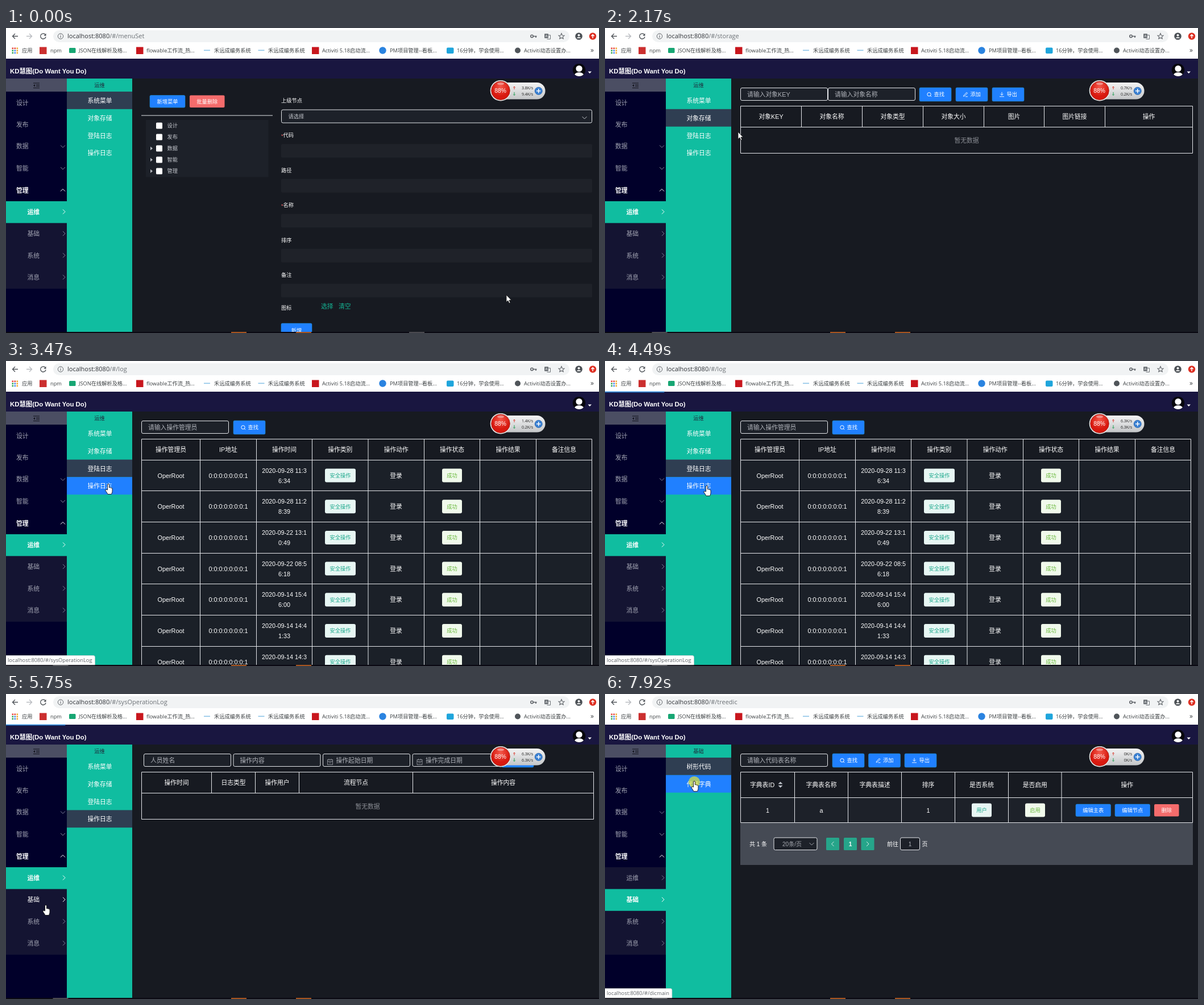
Write an HTML page that moves like this. It is 1043x537 px and loops after 8000 ms.

```html
<!DOCTYPE html>
<html lang="zh-CN">
<head>
<meta charset="utf-8">
<title>Admin console</title>
<style>
html, body { margin: 0; width: 100%; height: 100%; overflow: hidden; background: #171a21; }
svg { display: block; width: 100%; height: 100%; }
text { font-family: "Liberation Sans", "Noto Sans CJK SC", "Noto Sans CJK", sans-serif; white-space: pre; }
.ui { font-family: "Open Sans", "Noto Sans CJK SC", "Noto Sans CJK", sans-serif; }
</style>
</head>
<body>
<svg id="stage" viewBox="0 0 1043 537" preserveAspectRatio="none"></svg>
<script>
const LOOP = 8000, S = 9.24, M = 10.8;
const BLUE = '#2080ff', RED = '#f56c6c', GREEN = '#10bda0', LINE = '#e4e6ea', ROW = '#1d2129', BG = '#171a21';

// --- drawing helpers; text is placed by its vertical centre ---
const rect = (x, y, w, h, fill, extra = '') => `<rect x="${x}" y="${y}" width="${w}" height="${h}" fill="${fill}" ${extra}/>`;
const circle = (x, y, r, fill, extra = '') => `<circle cx="${x}" cy="${y}" r="${r}" fill="${fill}" ${extra}/>`;
const path = (d, stroke, w = 1, extra = 'fill="none"') => `<path d="${d}" stroke="${stroke}" stroke-width="${w}" ${extra}/>`;
const fillPath = (d, fill) => `<path d="${d}" fill="${fill}"/>`;
const text = (x, y, s, size = M, fill = '#fff', extra = '') =>
  `<text x="${x}" y="${(y + size * 0.37).toFixed(2)}" font-size="${size}" fill="${fill}" ${extra}>${s}</text>`;
const mid = (x, y, s, size, fill, extra = '') => text(x, y, s, size, fill, 'text-anchor="middle" ' + extra);
const ui = (x, y, s, size, fill, extra = '') => text(x, y, s, size, fill, 'class="ui" ' + extra);
const at = (from, to, body) => `<g data-on="${from},${to}">${body}</g>`;
const W5 = 'font-weight="500"';

const chevron = (x, y, dir, color) => {
  const d = { down: 'M-4-2L0 2L4-2', up: 'M-4 2L0-2L4 2', right: 'M-2-4L2 0L-2 4', left: 'M2-4L-2 0L2 4' }[dir];
  return `<g transform="translate(${x} ${y})">${path(d, color)}</g>`;
};
const icons = {
  search: circle(0, 0, 3.2, 'none', 'stroke="#fff"') + path('M2.3 2.3L4.2 4.2', '#fff'),
  edit: path('M-3 2L2-3.5L3.5-2L-1.5 3L-3.5 3.5ZM0 4H4', '#fff', .9),
  load: path('M0-4V1.5M-2.5-1L0 1.5L2.5-1M-4 4H4', '#fff', .9)
};
const box = (x, y, w, h = 23) => rect(x + .5, y + .5, w - 1, h - 1, ROW, `rx="2.5" stroke="${LINE}"`);
const field = (x, s, date) => box(x, 105, 154) +
  (date ? path(`M${x + 8.5} 115.5h9v9h-9zM${x + 8.5} 118.5h9M${x + 11} 114v2M${x + 15} 114v2M${x + 10.5} 121h5`, '#a5a8af', .8) : '') +
  text(x + (date ? 23.5 : 12), 116.5, s, M, '#b0b3ba');
const button = (x, y, w, h, s, fill = BLUE) =>
  rect(x, y, w, h, fill, `rx="2"` + (fill === BLUE ? ' stroke="#1b8fd0" stroke-width=".6"' : '')) +
  mid(x + w / 2, y + h / 2, s, S, '#fff', W5);
const tool = (x, icon, s) => rect(x, 105, 56, 24, BLUE, 'rx="2" stroke="#1b8fd0" stroke-width=".6"') +
  `<g transform="translate(${x + 17} 116.8)">${icons[icon]}</g>` + text(x + 25.5, 117, s, S, '#fff', W5);
const tag = (x, y, w, s, kind) => rect(x - w / 2, y - 12, w, 24, kind ? '#f0f9eb' : '#e7f6f3', 'rx="3"') +
  mid(x, y, s, S, kind ? '#67b83a' : '#1aa78b');

// table frame: column edges, row edges, heading texts
function grid(xs, ys, heads) {
  const x0 = xs[0], x1 = xs[xs.length - 1], y0 = ys[0], y1 = ys[ys.length - 1];
  const headY = (y0 + ys[1]) / 2;
  let d = '';
  ys.forEach(y => d += `M${x0} ${y}H${x1}`);
  xs.forEach((x, i) => {
    const edge = i === 0 || i === xs.length - 1 || ys.full;
    d += `M${x} ${y0}V${edge ? y1 : ys[1]}`;
  });
  return path(d, LINE) + heads.map((h, i) => mid((xs[i] + xs[i + 1]) / 2, headY, h, M, '#fff', W5)).join('');
}
const noData = grid => grid + mid(636, 197.5, '暂无数据', M, '#8d9097');

// --- browser chrome ---
function chrome() {
  const dots = ['#e8453c', '#e8453c', '#f0a92e', '#34a853', '#4285f4', '#f0a92e', '#34a853', '#4285f4', '#f0a92e'];
  const marks = [[78, 'npm'], [128, 'JSON在线解析及格...'], [247, 'flowable工作流_热...'], [366, '禾远成编务系统'],
    [461, '禾远成编务系统'], [556, 'Activiti 5.18启动流...'], [675, 'PM项目管理--看板...'],
    [793, '16分钟，学会使用...'], [911, 'Activiti动态设置办...']];
  return rect(0, 0, 1043, 54, '#fff') + rect(83, 4, 908, 21, '#f1f3f4', 'rx="10.5"') +
    path('M21 14.5H11.5M16 10L11.5 14.5L16 19', '#50555a', 1.4) + path('M36 14.5H45.5M41 10L45.5 14.5L41 19', '#b9bcc0', 1.4) +
    path('M69 11.5A4.7 4.7 0 1 0 70 15.5', '#50555a', 1.4) + fillPath('M70.5 9.5V13.7H66.3Z', '#50555a') +
    circle(96, 14.5, 4.7, 'none', 'stroke="#5f6368"') + path('M96 13.8V17M96 11.7V12.8', '#5f6368', 1.1) +
    circle(925, 14.5, 2.2, 'none', 'stroke="#5f6368" stroke-width="1.6"') + path('M927 14.5H933.5M932 14.5V17', '#5f6368', 1.7) +
    rect(947, 10, 7, 8, '#70757a', 'rx="1"') + path('M953 12.5H957.5V19.5H951.5', '#70757a') + mid(950.5, 14, 'A', 6, '#fff') +
    path('M977 9.5L978.5 13L982 13.3L979.3 15.6L980.2 19L977 17.2L973.8 19L974.7 15.6L972 13.3L975.5 13Z', '#5f6368', 1.1) +
    circle(1007.5, 14.5, 6.3, '#4c5156') + circle(1007.5, 12.8, 2, '#fff') + fillPath('M1003.6 18A4.2 3 0 0 1 1011.4 18Z', '#fff') +
    circle(1032, 14.5, 6.2, '#dd2f22') + path('M1032 18V12M1029.3 14.3L1032 11.5L1034.7 14.3', '#fff', 1.5) +
    dots.map((c, i) => rect(10.5 + i % 3 * 4, 34.5 + (i / 3 | 0) * 4, 2.6, 2.6, c)).join('') +
    ui(28, 39.5, '应用', S, '#3c4043') +
    rect(59, 33.5, 12.5, 12.5, '#cb2f2f') + rect(111, 35, 11.5, 9, '#17a673', 'rx="1.5"') +
    rect(229, 33.5, 12.5, 12.5, '#c8161d') + rect(348, 38.5, 11, 1.6, '#8cc4e8') + rect(443.5, 38.5, 11, 1.6, '#8cc4e8') +
    rect(538, 33.5, 12.5, 12.5, '#c8161d') + circle(662.5, 39.5, 6.2, '#2a83e0') +
    rect(775, 34.5, 12.5, 10.5, '#1fa5dc', 'rx="2"') + circle(900, 39.5, 5, '#50555a') +
    marks.map(m => ui(m[0], 39.5, m[1], S, '#3c4043')).join('') + ui(1028, 38.5, '»', 12, '#3c4043') +
    `<text id="url" class="ui" x="108" y="18.3" font-size="11" fill="#6b7075"><tspan fill="#303338">localhost:8080</tspan><tspan id="route"></tspan></text>`;
}

// --- application frame ---
function shell() {
  const mains = ['设计', '发布', '数据', '智能'];
  const subs = ['运维', '基础', '系统', '消息'];
  const bar = 'M48 97H59M53 100H59M53 102.5H59M48 105.5H59';
  return rect(0, 54, 1043, 35, '#191640') +
    text(7, 75.5, 'KD慧图(Do Want You Do)', 11.4, '#fff', 'font-weight="700"') +
    circle(1008, 74, 11.2, '#07070c') + `<clipPath id="face">${circle(1008, 74, 11)}</clipPath>` +
    `<g clip-path="url(#face)">${circle(1008, 71.5, 5.6, '#fff')}<ellipse cx="1008" cy="85" rx="9" ry="7" fill="#fff"/></g>` +
    fillPath('M1023.5 76.5H1030L1026.7 80Z', '#fff') +
    rect(0, 89, 107, 446, '#01002a') + rect(0, 89, 107, 23, '#4b4e63') + path(bar, '#12131c', 1.1) + fillPath('M51 99L48 101.2L51 103.4Z', '#12131c') +
    mains.map((s, i) => text(18, 131.5 + i * 38.4, s, M, '#a3a5b3')).join('') +
    chevron(100, 208.5, 'down', '#83859a') + chevron(100, 247, 'down', '#83859a') +
    text(18, 285.5, '管理', M, '#fff', 'font-weight="700"') + chevron(100, 285.5, 'up', '#fff') +
    rect(0, 305, 107, 154, '#141432') + rect(0, 305, 107, 38.4, GREEN, 'id="group"') +
    subs.map((s, i) => `<g class="sub" fill="#a3a5b3">${text(37.5, 324 + i * 38.4, s, M, 'inherit').replace('fill="inherit"', '')}` +
      `<g class="tip">${chevron(102, 323.5 + i * 38.4, 'right', 'currentColor')}</g></g>`).join('') +
    rect(107, 89, 115, 446, GREEN) + rect(107, 112, 115, 30.8, '#2f3e52', 'id="chosen"') + rect(107, 112, 115, 30.8, BLUE, 'id="hover"') +
    menu(0, 5760, '运维', ['系统菜单', '对象存储', '登陆日志', '操作日志']) +
    menu(5760, LOOP, '基础', ['树形代码', '代码字典']);
}
const menu = (a, b, head, items) => at(a, b, mid(164.5, 100.5, head, S, '#1f2d3d') +
  items.map((s, i) => mid(165, 128 + i * 30.75, s, M, '#fff', W5)).join(''));

// --- pages ---
function menuPage() {
  const labels = ['代码', '路径', '名称', '排序', '备注'];
  const tree = ['设计', '发布', '数据', '智能', '管理'];
  return button(253, 118.5, 62, 21.5, '新增菜单') + button(323, 118.5, 61.5, 21.5, '批量删除', RED) +
    rect(238, 153.5, 231, 1, LINE) + rect(246, 162, 215.5, 100.5, ROW) +
    tree.map((s, i) => {
      const y = 172 + i * 20;
      return rect(264, y - 5.5, 11, 11, '#fff', 'rx="1.5"') + text(283.5, y, s, S, '#c5c8ce') +
        (i > 1 ? fillPath(`M254 ${y - 3.2}L258 ${y}L254 ${y + 3.2}Z`, '#b5b8be') : '');
    }).join('') +
    text(484, 127.5, '上级节点', S, '#fff', W5) + box(484, 143.5, 547, 24) + text(496.5, 155.5, '请选择', S, '#c5c8ce') + chevron(1017.5, 158, 'down', '#c5c8ce') +
    labels.map((s, i) => {
      const y = 189 + i * 61.5, must = i % 2 === 0 && i < 4;
      return (must ? text(484, y + 1, '*', S, RED) : '') + text(must ? 487.5 : 484, y, s, S, '#fff', W5) +
        rect(484, y + 15.3, 547, 24, '#1f2229', 'rx="2"');
    }).join('') +
    text(484, 492.5, '图标', S, '#fff', W5) + text(554, 489.5, '选择', M, '#14b393') + text(585, 489.5, '清空', M, '#14b393') +
    button(484, 520, 54, 24.5, '新增');
}

function storePage() {
  return field(238, '请输入对象KEY') + field(392, '请输入对象名称') + tool(553, 'search', '查找') + tool(617, 'edit', '添加') + tool(681, 'load', '导出') +
    noData(grid([238.5, 345.5, 452.5, 559.5, 666.5, 772.5, 879.5, 1033.5], [137.5, 174.5, 220.5],
      ['对象KEY', '对象名称', '对象类型', '对象大小', '图片', '图片链接', '操作']));
}

function logPage() {
  const xs = [238.5, 341.5, 440.5, 538.5, 637, 735.5, 833.5, 932.5, 1030.5];
  const heads = ['操作管理员', 'IP地址', '操作时间', '操作类别', '操作动作', '操作状态', '操作结果', '备注信息'];
  const times = ['28 11:3|6:34', '28 11:2|8:39', '22 13:1|0:49', '22 08:5|6:18', '14 15:4|6:00', '14 14:4|1:33', '14 14:3|0:48'];
  const ys = [137.5, 174.5, ...times.map((_, i) => Math.round(174.5 + (i + 1) * 54.7) - .5)];
  ys.full = true;
  const rows = times.map((s, i) => {
    const y = 201.5 + i * 54.7, [a, b] = s.split('|');
    return mid(290, y, 'OperRoot', M) + mid(391, y, '0:0:0:0:0:0:0:1', M) +
      mid(489.5, y - 9, '2020-09-' + a, M) + mid(489.5, y + 9, b, M) +
      tag(588, y, 54, '安全操作') + mid(686, y, '登录', M) + tag(784.5, y, 35, '成功', 1);
  }).join('');
  return field(238, '请输入操作管理员') + tool(400, 'search', '查找') +
    at(2850, 3100, noData(grid(xs, [137.5, 174.5, 220.5], heads))) +
    at(3100, 4700, rect(238, 174.5, 792, 361, '#1b2028') + grid(xs, ys, heads) + rows);
}

function auditPage() {
  return field(242, '人员姓名') + field(399.5, '操作内容') + field(557, '操作起始日期', 1) + field(714.5, '操作完成日期', 1) + tool(872, 'search', '查找') +
    noData(grid([238.5, 361.5, 438.5, 515.5, 715.5, 1033.5], [137.5, 174.5, 220.5],
      ['操作时间', '日志类型', '操作用户', '流程节点', '操作内容']));
}

function dictPage() {
  const ys = [137.5, 182.5, 226.5];
  ys.full = true;
  return field(238, '请输入代码表名称') + tool(400, 'search', '查找') + tool(463.5, 'edit', '添加') + tool(527, 'load', '导出') +
    rect(238, 182.5, 796, 44, ROW) + rect(238, 227, 796, 74, '#454a54') +
    grid([238.5, 333.5, 427.5, 521.5, 615.5, 709.5, 803, 1033.5], ys, ['', '字典表名称', '字典表描述', '排序', '是否系统', '是否启用', '操作']) +
    text(255, 160, '字典表ID', M, '#fff', W5) + fillPath('M304.5 158.5L308.5 154.5L312.5 158.5ZM304.5 161L308.5 165L312.5 161Z', '#c0c4cc') +
    mid(286, 204.5, '1') + mid(380.5, 204.5, 'a') + mid(568.5, 204.5, '1') +
    tag(662.5, 204.5, 35, '用户') + tag(756.5, 204.5, 35, '启用', 1) +
    button(828, 194, 61.5, 21.5, '编辑主表') + button(897, 194, 61.5, 21.5, '编辑节点') + button(966, 194, 43.5, 21.5, '删除', RED) +
    text(254, 264, '共 1 条', 10, '#fff') + box(296.5, 252.5, 77, 22.5) + mid(329, 264, '20条/页', 10, '#a5a8af') + chevron(363.5, 264, 'down', '#a5a8af') +
    [389, 420, 450.5].map(x => rect(x, 253, 23, 22, '#26a58a', 'rx="1.5"')).join('') +
    chevron(400.5, 264, 'left', '#d5ece6') + mid(431.5, 264, '1', 10, '#fff', 'font-weight="700"') + chevron(462, 264, 'right', '#d5ece6') +
    text(496, 264, '前往', 10, '#fff') + box(519, 252.5, 35, 22.5) + mid(536.5, 264, '1', 10, '#b0b3ba') + text(557.5, 264, '页', 10, '#fff');
}

function widget() {
  return `<linearGradient id="pill" x2="0" y2="1"><stop stop-color="#f4f4f4"/><stop offset="1" stop-color="#c4c6c8"/></linearGradient>
    <radialGradient id="ball" cy=".3"><stop stop-color="#f4584a"/><stop offset="1" stop-color="#d8190f"/></radialGradient>` +
    rect(866, 96, 82.5, 29.5, 'url(#pill)', 'rx="14.7"') + circle(870, 110.2, 18.3, '#e6e4e2') + circle(870, 110.2, 16.3, 'url(#ball)', 'stroke="#a31812" stroke-width=".8"') +
    '<ellipse cx="870" cy="98" rx="6" ry="2.3" fill="#fff" opacity=".4"/>' + mid(869.5, 110, '88%', 10.3, '#fff') +
    path('M894 108V103M892.3 104.7L894 103L895.7 104.7', '#d8392c') + path('M894 113V118.5M892.3 116.8L894 118.5L895.7 116.8', '#1f9b50') +
    ui(927, 105, '', 7, '#222', 'id="up" text-anchor="end"') + ui(927, 116.5, '', 7, '#222', 'id="down" text-anchor="end"') +
    circle(936.7, 110.8, 6.6, '#3a80d2', 'stroke="#2462ad" stroke-width=".7"') + path('M933 110.8H940.4M936.7 107.1V114.5', '#fff', 1.5);
}

const cursor = `<g id="cursor">${circle(0, 1, 10, '#f2ea22', 'id="press" opacity=".65"')}
  <g id="arrow">${path('M0 0V12.6L2.9 9.9L5 14.6L7 13.7L5 9.2L8.8 9.1Z', '#111', .8, 'fill="#fff"')}${circle(11, 0, 4.6, 'none', 'id="busy" stroke="#2a8bf0" stroke-width="1.6"')}</g>
  <g id="hand">${path('M-1.5 10V1Q-1.5-.5 0-.5Q1.4-.5 1.4 1V6Q2.6 4.8 3.8 6.3Q5-.2 5 6.6Q6.6 6 7 8V12.5Q6.8 15 5.4 17.5H-1Q-3.2 13.5-5 11.2Q-5.6 9-3.6 9.3Z', '#111', .9, 'fill="#fff"').replace('Q5-.2 5 6.6', 'Q5 5.2 5.4 6.8')}</g></g>`;

const $ = id => document.getElementById(id);
$('stage').innerHTML = rect(0, 0, 1043, 537, BG) +
  at(0, 1640, menuPage()) + at(1640, 2850, storePage()) + at(2850, 4700, logPage()) +
  at(4700, 5840, auditPage()) + at(7000, LOOP, dictPage()) +
  chrome() + shell() + rect(0, 53.6, 0, 1.8, '#2a86d8', 'id="load"') +
  rect(0, 535, 1043, 2, '#0a0912') + rect(396, 535, 27, 2, '#a8551f') + rect(510, 535, 27, 2, '#a8551f') + rect(709, 535, 27, 2, '#4b4a50', 'id="task"') +
  `<g id="status"><path id="plate" fill="#fff" stroke="#c5c7ca" stroke-width=".7"/>${ui(3, 526.5, '', 9.3, '#5f6368', 'id="link"')}</g>` +
  widget() + cursor;

// --- timeline ---
const bursts = [[70, 300, 4], [470, 1230, 11], [1320, 2090, 11], [2170, 2930, 11], [3030, 3470, 7], [3790, 4030, 4],
  [4420, 5200, 11], [5290, 5290, 1], [5430, 5520, 2], [5680, 6450, 11], [6540, 7310, 11], [7390, 7390, 1], [7640, 7640, 1], [7920, 7920, 1]];
const ticks = [0];
bursts.forEach(([a, b, n]) => { for (let i = 0; i < n; i++) ticks.push(n > 1 ? Math.round((a + (b - a) * i / (n - 1)) / 10) * 10 : a); });

const moves = [[0, 880, 470], [70, 878, 468], [300, 800, 420], [470, 780, 410], [860, 195, 182], [1000, 181, 168], [1230, 178, 162],
  [1620, 178, 162], [1900, 205, 172], [2090, 238, 182], [2170, 234, 183], [2420, 185, 188], [2930, 176, 190], [3470, 180, 217],
  [3790, 180, 217], [4030, 179, 219], [4420, 179, 220], [4820, 140, 261], [5200, 70, 372], [5680, 70, 372], [6100, 122, 345],
  [6450, 140, 190], [6620, 140, 142], [6850, 149, 130], [7000, 150, 130], [7310, 157, 153], [8000, 157, 154]];
const routes = [[0, 'menuSet'], [1470, 'storage'], [2700, 'log'], [4570, 'sysOperationLog'], [5760, 'blank'], [6850, 'treedic']];
const picks = [[0, 0], [1470, 1], [2700, 2], [4570, 3], [5760, -1], [6850, 0]];
const links = [[0, ''], [1080, 'storage'], [1950, ''], [2480, 'log'], [3250, 'sysOperationLog'], [4960, ''], [6540, 'treedic'], [7230, 'dicmain']];
const rates = [[0, '3.8', '9.4'], [220, '0', '0'], [1930, '0.7', '0.2'], [3030, '1.4', '0.2'], [3870, '6.3', '6.3'], [5840, '2.4', '3.8'], [7000, '0', '0']];
const loads = [[1390, 1940], [2620, 3250], [4420, 4990], [5680, 6300], [6770, 7390]];
const presses = [[1310, 1470], [2540, 2700], [3790, 4030], [5430, 5520], [6690, 6850], [7920, 8000]];

const last = (list, t) => list.filter(r => r[0] <= t).pop();
const within = (list, t) => list.find(r => t >= r[0] && t < r[1]);
const show = (el, on) => el.setAttribute('visibility', on ? 'visible' : 'hidden');
const timed = [...document.querySelectorAll('[data-on]')].map(el => [el, ...el.dataset.on.split(',').map(Number)]);
const subs = [...document.querySelectorAll('.sub')];

function pointer(t) {
  const i = Math.max(1, moves.findIndex(m => m[0] > t));
  const [a, x, y] = moves[i - 1], [b, x2, y2] = moves[i], k = (t - a) / (b - a);
  return [x + (x2 - x) * k, y + (y2 - y) * k];
}

let drawn = -1;
function render(now) {
  const t = ticks.filter(v => v <= now).pop();
  if (t === drawn) return;
  drawn = t;
  timed.forEach(([el, a, b]) => el.style.display = t >= a && t < b ? '' : 'none');

  const base = t >= 5760 ? 1 : 0, count = base ? 2 : 4;
  const [x, y] = pointer(t);
  const row = x > 107 && x < 222 ? Math.floor((y - 112) / 30.8) : -1;
  const over = row >= 0 && row < count;
  const pick = last(picks, t)[1];
  $('chosen').setAttribute('y', 112 + pick * 30.8);
  show($('chosen'), pick >= 0);
  $('hover').setAttribute('y', 112 + row * 30.8);
  show($('hover'), over && row !== pick);

  $('group').setAttribute('y', 305 + base * 38.4);
  subs.forEach((el, i) => {
    const lit = i === base || (i === 1 && t >= 5290);
    el.setAttribute('fill', lit ? '#fff' : '#a3a5b3');
    el.setAttribute('color', lit ? '#fff' : '#83859a');
    el.setAttribute('font-weight', i === base ? 700 : 400);
  });

  $('route').textContent = '/#/' + last(routes, t)[1];
  const rate = last(rates, t), link = last(links, t)[1];
  $('up').textContent = rate[1] + 'K/s';
  $('down').textContent = rate[2] + 'K/s';
  $('status').style.display = link ? '' : 'none';
  if (link) {
    $('link').textContent = 'localhost:8080/#/' + link;
    const w = $('link').getComputedTextLength() + 8;
    $('plate').setAttribute('d', `M-1 518.5H${w - 3}Q${w} 518.5 ${w} 521.5V535H-1Z`);
  }
  const load = within(loads, t);
  $('load').setAttribute('width', load ? 1043 * Math.min(1, 0.1 + 1.5 * (t - load[0]) / (load[1] - load[0])) : 0);
  $('task').setAttribute('x', t < 1400 ? 709 : 82.5);

  const hand = over || (x < 107 && y > 112);
  $('cursor').setAttribute('transform', `translate(${x.toFixed(1)} ${y.toFixed(1)})`);
  show($('hand'), hand);
  show($('arrow'), !hand);
  show($('busy'), !hand && t >= 4650 && t < 4990);
  show($('press'), within(presses, t));
}

const start = performance.now();
(function frame() {
  render((performance.now() - start) % LOOP);
  requestAnimationFrame(frame);
})();
</script>
</body>
</html>
```
